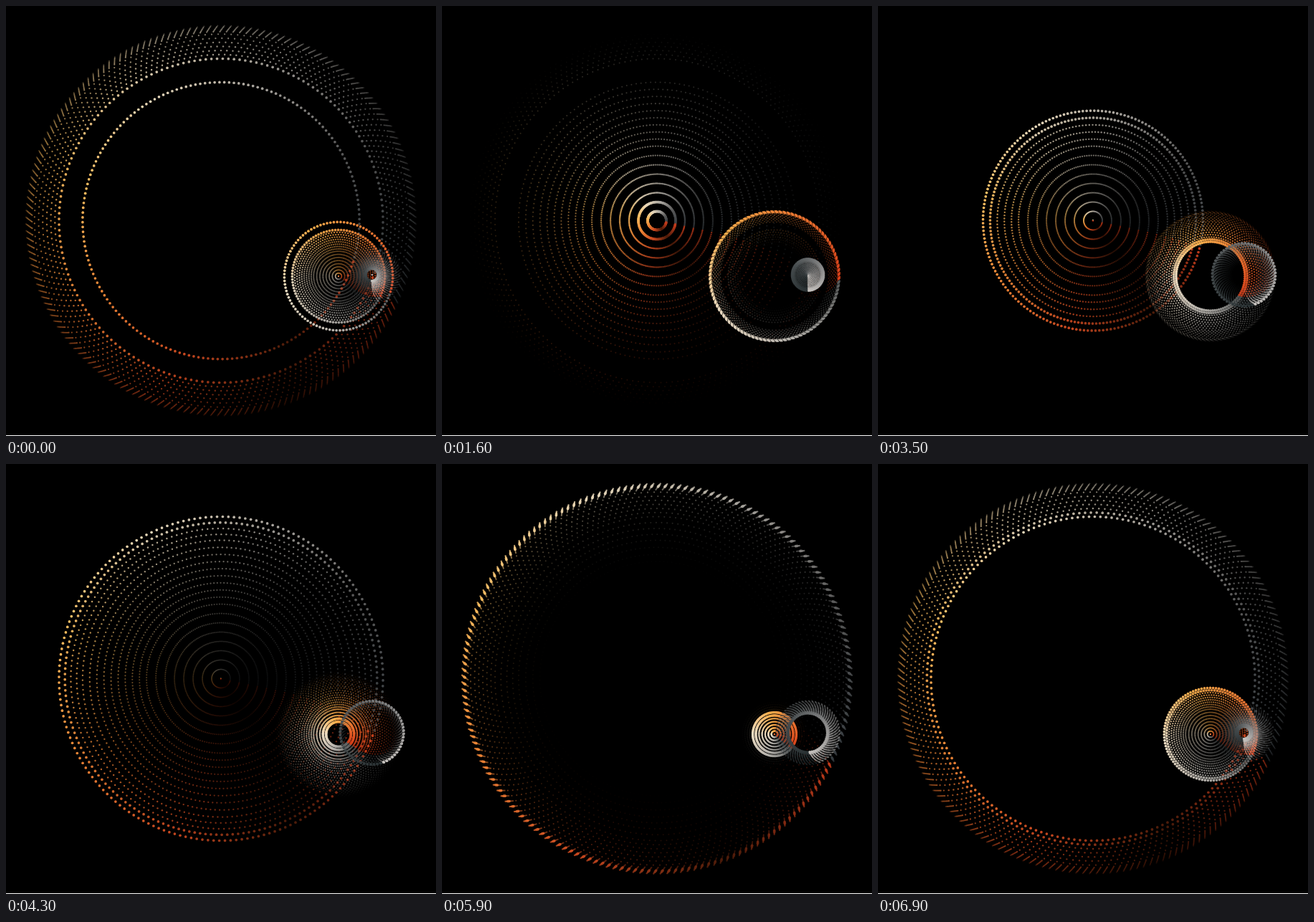
Write an HTML page with a canvas that moves like this. It is 600 px wide and 600 px high and loops after 7 s.

```html
<!DOCTYPE html>
<html>
<head>
<meta charset="utf-8">
<style>
html, body { margin: 0; height: 100%; overflow: hidden; background: #000; }
canvas { display: block; }
</style>
</head>
<body>
<canvas id="stage" width="600" height="600"></canvas>
<script>
const ctx = document.getElementById('stage').getContext('2d');
const STEP = 100, STEPS = 70, CYCLE = 73, TRAIL = 24;

// Key points: steps away from the closed pose, and relative radius.
const swell = [[2.5, 0], [10.5, 0.382], [19.5, 0.71], [23.5, 0.831], [30, 0.967], [36.5, 1]];

// closed: step with radius 0; seam: angle where the palette begins;
// twist: degrees the seam turns back as the ring opens; dir 1 is clockwise.
const rings = [
  { x: 300, y: 299.5, size: 272, dots: 180, closed: 19.5, dir: -1, seam: 10, twist: 15,
    palette: '363c40 585858 a8a49e e8d8ba f6bc60 ec8636 c84820 4a1b0a c43c1c' },
  { x: 464, y: 377, size: 91, dots: 100, closed: 49.5, dir: 1, seam: 42, twist: 38,
    palette: '585a5a b8b4ae eeddc2 f7ae4c ea7430 d83c18' },
  { x: 510.5, y: 375, size: 45, dots: 60, closed: 2.5, dir: 1, seam: 95, twist: 22,
    palette: '2a3234 464c4e 888888 c8c4c0' }
];

const mix = (a, b, u) => a + (b - a) * u;

function gradient(palette, count) {
  const stops = palette.split(' ').map(hex => hex.match(/../g).map(h => parseInt(h, 16)));
  return Array.from({ length: count }, (_, i) => {
    const p = i / count * (stops.length - 1), k = Math.floor(p);
    return `rgb(${stops[k].map((v, j) => Math.round(mix(v, stops[k + 1][j], p - k)))})`;
  });
}
for (const ring of rings) ring.colors = gradient(ring.palette, ring.dots);

function openness(ring, step) {
  const turn = Math.abs(step - ring.closed), d = Math.min(turn, CYCLE - turn);
  const i = Math.max(1, swell.findIndex(p => p[0] >= d));
  const [d0, q0] = swell[i - 1], [d1, q1] = swell[i];
  return Math.max(0, mix(q0, q1, (d - d0) / (d1 - d0)));
}

function drawRing(ring, step, age) {
  const q = openness(ring, step), r = Math.max(0.5, q * ring.size);
  const start = (ring.seam - ring.dir * ring.twist * q ** 3) * Math.PI / 180;
  const dot = r < 1 ? 0.6 : age < 2 ? 1.85 : 1.25 - age * 0.015;
  ctx.globalAlpha = age < 2 ? 1 - age * 0.08 : 0.88 * (1 - age / TRAIL) ** 1.25;
  ring.colors.forEach((color, i) => {
    const a = start + ring.dir * i / ring.dots * 2 * Math.PI;
    ctx.fillStyle = color;
    ctx.beginPath();
    ctx.arc(ring.x + r * Math.cos(a), ring.y + r * Math.sin(a), dot, 0, 7);
    ctx.fill();
  });
}

function draw(step) {
  ctx.globalAlpha = 1;
  ctx.fillStyle = '#000';
  ctx.fillRect(0, 0, 600, 600);
  for (const ring of rings)
    for (let age = TRAIL - 1; age >= 0; age--)
      drawRing(ring, (step - age + STEPS) % STEPS, age);
  // Light edge along the bottom of the stage
  ctx.globalAlpha = 1;
  ctx.fillStyle = '#fff';
  ctx.fillRect(0, 599, 600, 1);
}

const begin = performance.now();
let shown = -1;
function tick() {
  const step = Math.floor((performance.now() - begin) / STEP) % STEPS;
  if (step !== shown) draw(shown = step);
  requestAnimationFrame(tick);
}
tick();
</script>
</body>
</html>
```
